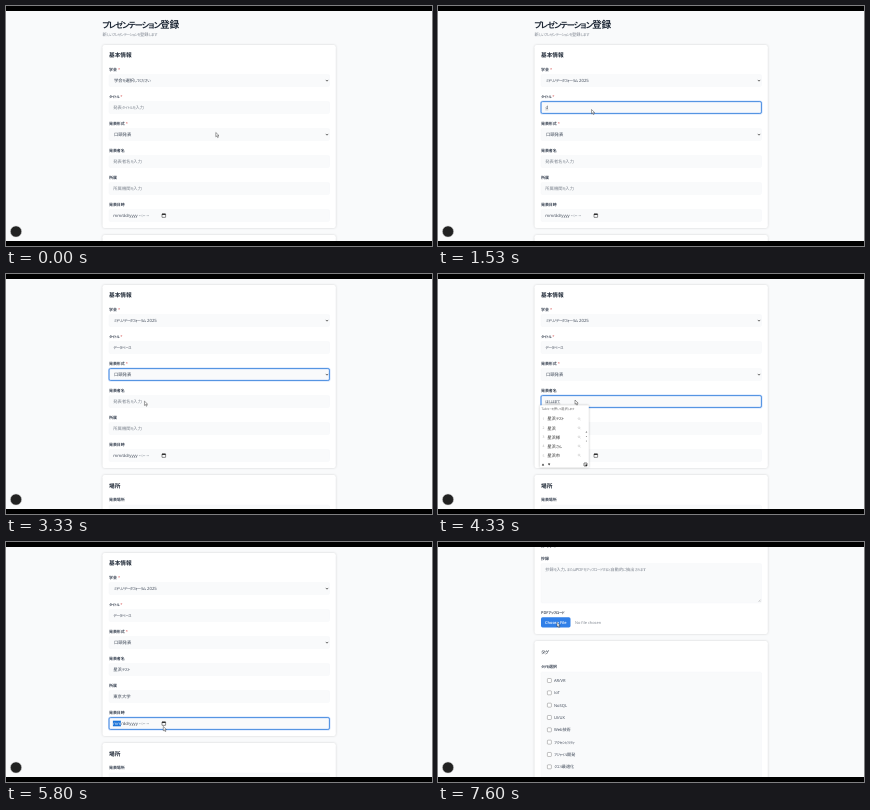
Recreate the animation shown at these times as an HTML page. Size 426x240 px, loop 8 s.

```html
<!DOCTYPE html>
<html lang="ja">
<head>
<meta charset="utf-8">
<title>プレゼンテーション登録</title>
<style>
html, body { margin: 0; width: 100%; height: 100%; overflow: hidden; background: #000; }
svg { display: block; width: 426px; height: 240px; }
text {
  font-family: "Open Sans", "Noto Sans CJK JP", "Noto Sans CJK", sans-serif;
  font-feature-settings: "palt";
  text-rendering: geometricPrecision;
  white-space: pre;
}
.kana { font-size: .84em; letter-spacing: -.13em; }
.card { filter: drop-shadow(0 .4px .8px rgba(0, 0, 0, .16)); }
.popup { filter: drop-shadow(0 .5px 1px rgba(0, 0, 0, .25)); }
</style>
</head>
<body>
<svg viewBox="0 0 426 240">
  <rect width="426" height="240" fill="#f9fafb"/>
  <g id="page"><g id="form"></g><g id="live"></g></g>
  <circle cx="10" cy="225.5" r="5.6" fill="#222" stroke="#d4d4d4" stroke-width=".5"/>
  <path id="cursor" d="M0 0v4.3l1-.9.8 1.7.8-.4-.8-1.6h1.4z" fill="#fff" stroke="#333" stroke-width=".45"/>
  <path d="M0 0h426v5H0zM0 235h426v5H0z"/>
</svg>
<script>
const LOOP = 8000;
const INK = '#1f2937', LABEL = '#374151', GREY = '#7b828d', BLUE = '#3b82f6';
const LEFT = 103, WIDTH = 220.5, TEXT_X = 107.3;
const $ = id => document.getElementById(id);

// ---------- drawing helpers ----------
const rect = (x, y, w, h, fill, r = 0, extra = '') =>
  `<rect x="${x}" y="${y}" width="${w}" height="${h}" rx="${r}" fill="${fill}" ${extra}/>`;
const path = (d, extra) => `<path d="${d}" ${extra}/>`;
const outline = (color, width = .4) => `stroke="${color}" stroke-width="${width}"`;

// Kana are set smaller and tighter than kanji, as in a compact UI face.
const compact = s => s.replace(/[\u3041-\u30ff]+/g, '<tspan class="kana">$&</tspan>');
const text = (x, midY, size, s, fill = INK, weight = 400, anchor = 'start') =>
  `<text x="${x}" y="${midY + size * .36}" font-size="${size}" fill="${fill}" font-weight="${weight}" text-anchor="${anchor}">${compact(s)}</text>`;

const card = (top, bottom) => rect(96.5, top, 233.3, bottom - top, '#fff', 2.2, 'class="card"');
const heading = (y, s) => text(LEFT, y, 5.7, s, INK, 600);
const label = (y, s, required) =>
  text(LEFT, y, 3.95, s + (required ? ' <tspan fill="#dc6a6a">*</tspan>' : ''), LABEL, 600);
const input = (midY, h = 12) => rect(LEFT, midY - 6, WIDTH, h, '#f9fafb', 1.6, outline('#f3f4f6'));
const chevron = y => path(`M319.8 ${y - .6}l1.2 1.3 1.2-1.3`, `fill="none" ${outline('#222', .65)}`);

// ---------- static form ----------
const FIELDS = [
  ['学会', true], ['タイトル', true], ['発表形式', true], ['発表者名'], ['所属'], ['発表日時']
];
const fieldY = i => 74.5 + 27 * i;
const TAGS = ['AR/VR', 'IoT', 'NoSQL', 'UI/UX', 'Web技術', 'アクセシビリティ', 'アジャイル開発', 'クエリ最適化'];

function calendarIcon(x, y) {
  return rect(x - 1.8, y - 1.6, 3.6, 3.5, 'none', .3, outline('#222', .5)) +
    rect(x - 1.8, y - 1.8, 3.6, 1.2, '#222');
}

function form() {
  let s = text(96.2, 19, 9.7, 'プレゼンテーション登録', INK, 600) +
    text(96.4, 28.7, 4.3, '新しいプレゼンテーションを登録します', GREY);

  s += card(39, 222) + heading(49.3, '基本情報');
  FIELDS.forEach(([name, required], i) => {
    s += label(fieldY(i) - 11, name, required) + input(fieldY(i));
  });
  s += chevron(fieldY(0)) + chevron(fieldY(2)) + calendarIcon(157.8, fieldY(5));

  s += card(229, 321) + heading(239.5, '場所') + label(254, '発表場所') + input(265) + chevron(265) +
    text(TEXT_X + 1, 265, 4.3, '場所を選択してください', LABEL) +
    text(LEFT, 275.6, 3.95, '学会を選択すると、その学会の会場が表示されます', GREY) +
    rect(LEFT, 289.5, WIDTH, 25.5, '#fdfdfe', 2, outline('#e5e7eb', .6)) +
    text(213, 302, 4.3, 'この学会には場所が登録されていません', GREY, 400, 'middle');

  s += card(329, 429) + heading(339.5, '抄録とPDF') + label(353.6, '抄録') + input(364.5, 39.5) +
    text(TEXT_X, 364.2, 4.2, '抄録を入力、またはPDFをアップロードすると自動的に抽出されます', GREY) +
    path('M320.6 396.6l2-2M321.8 396.8l.9-.9', outline('#777', .35)) +
    label(407.5, 'PDFアップロード') +
    rect(LEFT, 412.2, 29.5, 10.2, '#3180e8', 1.6) +
    text(117.8, 417.3, 3.95, 'Choose File', '#fff', 600, 'middle') +
    text(137, 417.3, 3.95, 'No file chosen', GREY);

  s += card(436, 640) + text(LEFT, 447, 5.7, 'タグ', INK, 500) + label(461.2, 'タグを選択') +
    rect(LEFT, 467, WIDTH, 170, '#f9fafb', 1.6, outline('#f3f4f6'));
  TAGS.forEach((tag, i) => {
    const y = 475.5 + 12.33 * i;
    s += rect(109.4, y - 2, 4, 4, '#fff', .7, outline('#777', .45)) + text(116, y, 4.1, tag, LABEL);
  });
  return s;
}

// ---------- timeline ----------
const at = (steps, t) => steps.filter(([time]) => time <= t).pop()[1];
const within = (t, a, b) => t >= a && t < b;

function tween(keys, t) {
  const i = keys.findIndex(k => k[0] > t);
  if (i < 0) return keys[keys.length - 1].slice(1);
  const a = keys[i - 1], b = keys[i];
  const u = (t - a[0]) / (b[0] - a[0]);
  const e = u * u * (3 - 2 * u);
  return a.slice(1).map((v, k) => v + (b[k + 1] - v) * e);
}

function scrollAt(t) {
  if (t < 6600) return tween([[0, 0], [3070, 0], [3330, 28]], t)[0];
  if (t < 6870) return 28 + 112.5 * (t - 6600) / 270;
  const u = Math.min(1, (t - 6870) / 560);
  return 140.5 + 196.5 * (1 - (1 - u) ** 1.6);
}

const CURSOR = [
  [0, 209.8, 126.5], [20, 209.8, 126.5], [270, 186, 74], [400, 186, 74], [530, 182, 90],
  [800, 182, 107], [870, 182, 107], [1000, 153.5, 103.5], [2530, 153.5, 103.5], [2800, 154.5, 131],
  [2930, 154.5, 131], [3070, 150, 136], [3400, 137, 126], [4400, 137, 126], [4530, 166, 149],
  [4750, 166, 149], [5000, 150, 153], [5420, 150, 153], [5530, 157.3, 184.5], [5950, 157.3, 184.5],
  [6200, 132, 143], [6450, 132, 143], [6600, 118, 168], [6870, 96, 175], [7050, 80, 160],
  [7200, 84, 140], [7470, 130, 68], [7600, 119, 80.5]
];
const FOCUS = [[0, -1], [330, 0], [730, 1], [2870, 2], [3470, 3], [4800, 4], [5800, 5], [6600, -1]];

const EVENT = 'ミドリノデータフォーラム 2025';
const PICK_EVENT = '学会を選択してください';
const ENTRIES = [
  {
    field: 1, hint: '発表タイトルを入力', open: 1670, done: 2530,
    typed: [[0, ''], [1530, 'ｄ'], [1670, 'で'], [1730, 'でー'], [1800, 'でーｔ'], [2000, 'でーた'],
      [2130, 'でーたｂ'], [2200, 'でーたべ'], [2330, 'でーたべー'], [2400, 'でーたべーす'], [2470, 'データベース']],
    words: ['データベース', 'データ', 'データ設計', 'でーた', 'データ分析']
  },
  {
    field: 3, hint: '発表者名を入力', open: 3730, done: 4470,
    typed: [[0, ''], [3730, 'ほ'], [3800, 'ほし'], [4000, 'ほしは'], [4130, 'ほしはま'],
      [4330, 'ほしはまて'], [4470, '星浜テスト']],
    words: ['星浜テスト', '星浜', '星浜様', '星浜さん', '星浜市']
  },
  {
    field: 4, hint: '所属機関を入力', open: 5200, done: 5470,
    typed: [[0, ''], [5200, 'と'], [5270, 'とうきょう'], [5330, 'とうきょうだ'], [5400, '東京大学']],
    words: ['東京大学', '東京', '東京都', '東京駅', '東京大']
  }
];

// ---------- moving parts ----------
function focusRing(i) {
  const y = fieldY(i) - 6;
  return rect(LEFT, y, WIDTH, 12, 'none', 1.6, outline('rgba(59,130,246,.25)', 2)) +
    rect(LEFT, y, WIDTH, 12, 'none', 1.6, outline('#4a8ee0', .9));
}

function dropdown(i, options, active) {
  const top = fieldY(i) + 5.8, row = 7.5;
  return rect(LEFT, top, WIDTH, row * options.length, '#fff', 0, outline('#777', .4)) +
    options.map((option, k) =>
      (k === active ? rect(LEFT, top + row * k, WIDTH, row, '#465260') : '') +
      text(TEXT_X + .7, top + row * (k + .5), 4.3, option, k === active ? '#fff' : INK)).join('');
}

function suggestions(midY, words) {
  const top = midY + 3.8;
  let s = rect(101.8, top, 49, 62.3, '#fff', .8, 'class="popup"') +
    text(103.5, midY + 7, 3.3, 'Tabキーを押して選択します', '#666');
  words.forEach((word, k) => {
    const y = midY + 17.4 + 9.1 * k;
    s += text(104.5, y, 3.4, String(k + 1), '#aaa') + text(109.2, y, 4.3, word, '#333') +
      `<circle cx="141" cy="${y - .3}" r=".9" fill="none" ${outline('#aaa', .35)}/>` +
      path(`M141.7 ${y + .4}l.9.9`, outline('#aaa', .35));
  });
  s += path(`M147.5 ${midY + 31}l.9-1.3.9 1.3z`, 'fill="#555"') +
    [35, 39.5].map(d => `<circle cx="148.4" cy="${midY + d}" r=".5" fill="#777"/>`).join('');
  const foot = midY + 63;
  return s + path(`M103.8 ${foot + 1}l1.2-2 1.2 2zM109.9 ${foot - 1}l1.2 2 1.2-2z`, 'fill="#222"') +
    rect(146, foot - 1.5, 3, 3, '#fff', .3, outline('#222', .6)) + rect(147.5, foot, 1.5, 1.5, '#222');
}

function entry({ field, hint, open, done, typed, words }, t) {
  const y = fieldY(field), value = at(typed, t);
  if (!value) return text(TEXT_X, y, 4.3, hint, GREY);
  const composing = t < done;
  const wide = value.length * 3;
  return text(TEXT_X, y, 4.3, value, LABEL) +
    (composing ? path(`M${TEXT_X} ${y + 2.4}h${wide}`, outline('#777', .35)) : '') +
    (composing && t >= open ? suggestions(y, words) : '');
}

function dateField(t) {
  const y = fieldY(5);
  if (t >= 6250) return text(TEXT_X, y, 4.2, '10/22/2025 12:52 AM', LABEL);
  const active = t >= 5800;
  const month = active ? '<tspan fill="#fff">mm</tspan>' : 'mm';
  return (active ? rect(106.9, y - 2.8, 8, 5.6, '#1a73d8') : '') +
    text(TEXT_X, y, 4.2, month + '/dd/yyyy --:-- --', LABEL);
}

function datePicker(picked) {
  const top = 120, middle = (x, y, s, color) => text(x, y, 3.6, s, color, 400, 'middle');
  const chip = (x, y) => rect(x - 3.7, y - 3.7, 7.4, 7.4, '#1a73e8', 1);
  let s = rect(LEFT, top, 94, 81, '#fff', 1, 'class="popup"') +
    text(106, top + 7, 3.9, 'October 2025 ▾', INK, 600) +
    path('M145 128.2v-3.6m-1.2 1.2l1.2-1.2 1.2 1.2M154 124.6v3.6m-1.2-1.2l1.2 1.2 1.2-1.2', `fill="none" ${outline('#444', .5)}`);
  [...'SMTWTFS'].forEach((d, i) => s += middle(108 + 8 * i, top + 15, d, GREY));
  for (let day = 1; day <= 31; day++) {
    const slot = day + 2, x = 108 + 8 * (slot % 7), y = 144 + 9 * Math.floor(slot / 7);
    const on = day === 22;
    if (on) s += picked ? chip(x, y) : rect(x - 3.7, y - 3.7, 7.4, 7.4, 'none', 1, outline('#1a73e8', .5));
    s += middle(x, y, String(day), on && picked ? '#fff' : INK);
  }
  for (let k = 0; k < 6; k++) {
    const y = 130 + 10 * k, color = k ? INK : '#fff';
    if (!k) s += chip(169, y) + chip(179.5, y) + chip(190, y);
    s += middle(169, y, String(k || 12).padStart(2, '0'), color) + middle(179.5, y, String(52 + k), color);
    if (k < 2) s += middle(190, y, k ? 'PM' : 'AM', color);
  }
  return s + text(106, 195, 3.6, 'Clear', '#1a73e8') + text(150, 195, 3.6, 'Today', '#1a73e8');
}

function live(t) {
  const focus = at(FOCUS, t);
  let s = focus < 0 ? '' : focusRing(focus);
  s += text(TEXT_X + .7, fieldY(0), 4.3, t < 600 ? PICK_EVENT : EVENT, LABEL) +
    text(TEXT_X + .7, fieldY(2), 4.3, '口頭発表', LABEL) + dateField(t);
  s += ENTRIES.map(e => entry(e, t)).reverse().join('');
  if (within(t, 330, 600)) s += dropdown(0, [PICK_EVENT, EVENT], t < 500 ? 0 : 1);
  if (within(t, 2870, 3050)) s += dropdown(2, ['口頭発表', 'ポスター発表'], 0);
  if (within(t, 5930, 6600)) s += datePicker(t >= 6250);
  return s;
}

// ---------- playback ----------
let shown = '';
function frame(now) {
  const t = now % LOOP;
  const markup = live(t);
  if (markup !== shown) $('live').innerHTML = shown = markup;
  $('page').setAttribute('transform', `translate(0 ${-scrollAt(t)})`);
  $('cursor').setAttribute('transform', `translate(${tween(CURSOR, t)})`);
}

$('form').innerHTML = form();
const start = performance.now();
function loop() {
  frame(performance.now() - start);
  requestAnimationFrame(loop);
}
loop();
</script>
</body>
</html>
```
